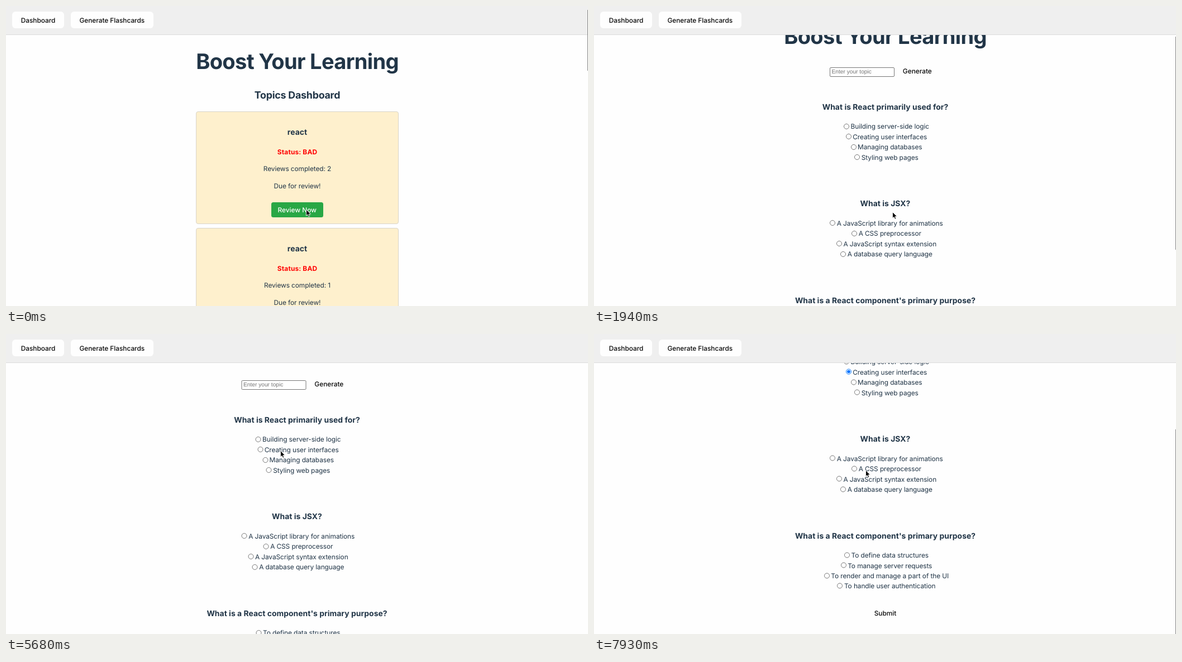
Write an HTML page that moves like this. It is 1042 px wide and 538 px high and loops after 8000 ms.

```html
<!DOCTYPE html>
<html lang="en">
<head>
<meta charset="utf-8">
<title>Boost Your Learning</title>
<style>
html, body { margin: 0; width: 100%; height: 100%; overflow: hidden; background: #fefefe; }
#stage {
  position: absolute; left: 0; top: 0; width: 1042px; height: 538px; overflow: hidden;
  background: #fefefe; color: #213547;
  font: 400 11.9px Inter, "Open Sans", sans-serif; letter-spacing: -.008em;
  font-optical-sizing: none; text-rendering: geometricPrecision; white-space: nowrap;
}
#stage div { position: absolute; box-sizing: border-box; }
/* zero-height lines: the text is centred vertically on its top value */
#stage .line {
  left: 0; width: 1043px; height: 0; line-height: 0;
  display: flex; justify-content: center; align-items: center;
}
.h1 { font-size: 38.1px; font-weight: 700; letter-spacing: -.018em; }
.h2 { font-size: 17.8px; font-weight: 700; letter-spacing: -.012em; }
.h3 { font-size: 13.9px; font-weight: 700; letter-spacing: .003em; }
.status { font-weight: 700; letter-spacing: .013em; color: #f00; }
.btn {
  display: flex; align-items: center; justify-content: center;
  font-weight: 500; letter-spacing: -.004em; color: #0a0a0a;
}
#nav { left: 0; top: 0; width: 1042px; height: 52px; background: #efefef; border-bottom: 1px solid #dcdcdc; }
#nav .btn { top: 10px; height: 30px; border-radius: 6px; background: #fefefe; }
.card {
  left: 339.5px; width: 363.5px; height: 201.5px;
  background: #fef0cd; border: 1px solid #d9d5c9; border-radius: 4px;
}
.review { left: 474.5px; width: 93.5px; height: 27px; border-radius: 3.5px; background: #28a745; }
#stage .review { color: #fff; }
#scroll, #board, #quiz { left: 0; top: 0; width: 1043px; height: 0; }
.field {
  left: 421.5px; width: 116px; height: 17px; padding-left: 3px; line-height: 15px;
  border: 1px solid #767676; border-radius: 2px; background: #fff;
  font-family: "Liberation Sans", Arial, sans-serif; font-size: 10.2px; letter-spacing: 0; color: #757575;
}
.radio {
  position: relative; top: -.5px; box-sizing: border-box; width: 10px; height: 10px;
  margin: 0 2.5px 0 4px; border: 1px solid #767676; border-radius: 50%; background: #fff;
}
.radio.on { border-color: #0075ff; background: radial-gradient(circle, #0075ff 2.5px, #fff 3.1px); }
#back { left: 485px; width: 72px; height: 17px; border-radius: 5px; background: #f3f3f3; }
#bar { left: 1041px; width: 1px; background: #868686; }
#cursor { position: absolute; left: -1px; top: -1px; overflow: visible; }
</style>
</head>
<body>
<div id="stage">
  <div id="scroll">
    <div id="board"></div>
    <div id="quiz"></div>
  </div>
  <div id="nav">
    <div class="btn" style="left:11px;width:93px">Dashboard</div>
    <div class="btn" style="left:115.5px;width:148.5px">Generate Flashcards</div>
  </div>
  <div id="bar"></div>
  <svg id="cursor" width="12" height="17">
    <path d="M1 1V12.2L3.6 9.8L5.3 13.8L7.3 12.9L5.6 9.1H9.1Z" fill="#000" stroke="#fff" stroke-width=".9"/>
  </svg>
</div>
<script>
const $ = id => document.getElementById(id);
const scroll = $('scroll'), board = $('board'), quiz = $('quiz'), bar = $('bar'), cursor = $('cursor');

function add(parent, cls, top, html) {
  const el = document.createElement('div');
  el.className = cls;
  el.style.top = top + 'px';
  el.innerHTML = html;
  parent.append(el);
  return el;
}

add(scroll, 'line h1', 99.5, 'Boost Your Learning');

// Topics dashboard
add(board, 'line h2', 160.5, 'Topics Dashboard');
[2, 1].forEach((count, n) => {
  const y = 189 + n * 209;
  add(board, 'card', y, '');
  add(board, 'line h3', y + 37.5, 'react');
  add(board, 'line status', y + 72.5, 'Status: BAD');
  add(board, 'line', y + 103.3, 'Reviews completed: ' + count);
  add(board, 'line', y + 134, 'Due for review!');
  add(board, 'btn review', y + 162.5, 'Review Now');
});

// Quiz
const questions = [
  ['What is React primarily used for?', 'Building server-side logic', 'Creating user interfaces',
    'Managing databases', 'Styling web pages'],
  ['What is JSX?', 'A JavaScript library for animations', 'A CSS preprocessor',
    'A JavaScript syntax extension', 'A database query language'],
  ["What is a React component's primary purpose?", 'To define data structures', 'To manage server requests',
    'To render and manage a part of the UI', 'To handle user authentication']
];
add(quiz, 'field', 154.5, 'Enter your topic');
const generate = add(quiz, 'line btn', 162.3, 'Generate');
generate.style.left = '57.3px';
questions.forEach(([title, ...answers], n) => {
  const y = 226.7 + n * 173.4;
  add(quiz, 'line h3', y, title);
  answers.forEach((text, k) =>
    add(quiz, 'line', y + 34.6 + k * 18.45, `<span class="radio"></span><span>${text}</span>`));
});
const back = add(quiz, '', 703.5, '');
back.id = 'back';
add(quiz, 'line btn', 712, 'Submit');
const picked = quiz.querySelectorAll('.radio')[1];

// Tracks: [step, value, ...], linear between entries
const scrollTrack = [[10, 0], [11, 11], [12, 33], [13, 45], [14, 45], [17, 56.5], [26, 56.5],
  [27, 65], [28, 72], [44, 72], [49, 172.5], [51, 211.5]];
const barTrack = [[0, 1], [2, 0], [10, 0], [11, 1], [19, 1], [21, 0], [26, 0], [27, 1],
  [30, 1], [33, 0], [44, 0], [45, 1]];
const cursorTrack = [[3, 537.5, 365], [8, 534.5, 369.5], [14, 534.5, 369.5], [19, 504.5, 258], [21, 475, 231],
  [25, 513, 254.5], [29, 513, 254.5], [33, 503, 222], [37, 503, 222], [38, 491.5, 209.5],
  [41, 484, 206], [44, 484, 206], [49, 540, 273.5], [51, 540, 273.5], [53, 486.5, 244.5]];

function sample(track, step) {
  const k = track.findIndex(p => p[0] >= step);
  if (k < 0) return track[track.length - 1].slice(1);
  if (k === 0) return track[0].slice(1);
  const a = track[k - 1], b = track[k], u = (step - a[0]) / (b[0] - a[0]);
  return a.slice(1).map((v, i) => v + (b[i + 1] - v) * u);
}

const startOf = step => step * 150 - (step > 11) * 10 - (step > 32) * 10;
function stepAt(t) {
  let step = 53;
  while (startOf(step) > t) step--;
  return step;
}

function render(step) {
  const [y] = sample(scrollTrack, step), [x, cy] = sample(cursorTrack, step);
  const onBoard = step < 5;
  board.style.display = onBoard ? '' : 'none';
  quiz.style.display = onBoard ? 'none' : '';
  const dx = step >= 33 && step < 41 ? -.5 : 0;
  scroll.style.transform = `translate(${dx}px, ${-y}px)`;
  picked.classList.toggle('on', step >= 42);
  back.style.visibility = step < 51 ? 'inherit' : 'hidden';
  bar.style.top = (onBoard ? 7 : 23.3 + y * .698) + 'px';
  bar.style.height = (onBoard ? 109 : 382) + 'px';
  bar.style.opacity = sample(barTrack, step)[0];
  cursor.style.transform = `translate(${x}px, ${cy}px)`;
}

const t0 = performance.now();
let shown = -1;
function tick() {
  const step = stepAt((performance.now() - t0) % 8000);
  if (step !== shown) render(shown = step);
  requestAnimationFrame(tick);
}
tick();
</script>
</body>
</html>
```
